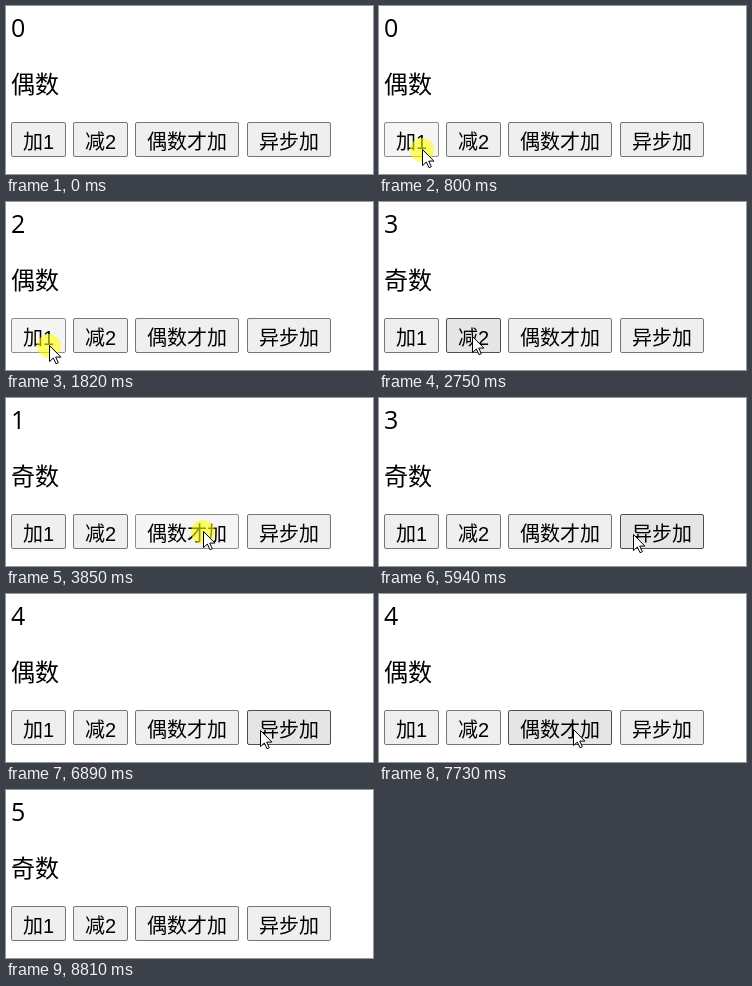
Recreate the animation shown at these times as an HTML page. Size 367 by 168 pixels, loop 9270 ms.

```html
<!DOCTYPE html>
<html lang="zh-CN">
<head>
<meta charset="utf-8">
<title>计数器</title>
<style>
  html, body { margin: 0; width: 100%; height: 100%; overflow: hidden; background: #fff; }
  svg { display: block; width: 367px; height: 168px; }
  text { font-weight: 350; }
  #parity { font-size: 24px; font-family: "Noto Sans CJK SC", "Noto Sans CJK", sans-serif; }
  #count { font-size: 25px; font-weight: 400; font-family: "Open Sans", "Noto Sans", sans-serif; }
  .btn text { font-size: 20px; font-family: "Liberation Sans", "Noto Sans CJK SC", "Noto Sans CJK", sans-serif; }
  .btn rect { fill: #efefef; stroke: #767676; }
  .btn.hover rect { fill: #e5e5e5; stroke: #4f4f4f; }
  .btn.active rect { fill: #f5f5f5; stroke: #8d8d8d; }
  #glow { fill: #ff0; opacity: .58; }
</style>
</head>
<body>
<svg viewBox="0 0 367 168">
  <text id="count" x="5" y="31"></text>
  <text id="parity" x="5" y="87"></text>
  <g id="buttons"></g>
  <g id="pointer">
    <circle id="glow" cy="1" r="12"/>
    <path d="M.5 .5V16.6L4.3 13 7 18.7 9.3 17.7 6.7 12.1H11.9Z" fill="#fff" stroke="#000"/>
  </g>
</svg>
<script>
const LOOP = 9270, ENTER = 130, LEAVE = 8810;
const TICK = 76, HOLD = 150, ASYNC_DELAY = 480;
const TOP = 116, HEIGHT = 35;

const plusOne = n => n + 1;
const minusTwo = n => n - 2;
const plusIfEven = n => n % 2 ? n : n + 1;

const inc = { label: "加1", rule: plusOne };
const dec = { label: "减2", rule: minusTwo };
const even = { label: "偶数才加", rule: plusIfEven };
const later = { label: "异步加", rule: plusOne, delay: ASYNC_DELAY };
const buttons = [inc, dec, even, later];

// The pointer's stops: arrival time, ticks spent travelling, clicks made there
const visits = [
  { on: inc, x: 43, y: 143, arrive: 738, ticks: 9, clicks: [800, 1190, 1820] },
  { on: dec, x: 93, y: 134, arrive: 2420, ticks: 7, clicks: [2760] },
  { on: even, x: 197, y: 133, arrive: 3150, ticks: 3, clicks: [3380, 3850] },
  { on: inc, x: 12, y: 139, arrive: 4390, ticks: 5, clicks: [4555] },
  { on: even, x: 168, y: 133, arrive: 5010, ticks: 3, clicks: [5240] },
  { on: later, x: 254, y: 136, arrive: 5940, ticks: 3, clicks: [6260] },
  { on: even, x: 194, y: 135, arrive: 7730, ticks: 4, clicks: [8080] },
  { x: 278, y: 163, arrive: 8725, ticks: 3, clicks: [] }
];

const presses = visits.flatMap(v => v.clicks);
const updates = visits
  .flatMap(({ on, clicks }) => clicks.map(at => ({ at: at + HOLD + (on.delay || 0), rule: on.rule })))
  .sort((a, b) => a.at - b.at);

const $ = id => document.getElementById(id);

function add(parent, tag, attrs, text = "") {
  const el = document.createElementNS("http://www.w3.org/2000/svg", tag);
  for (const key in attrs) el.setAttribute(key, attrs[key]);
  el.textContent = text;
  return parent.appendChild(el);
}

// Lay the buttons out in a row, each as wide as its label plus padding
let left = 5;
for (const b of buttons) {
  b.x = Math.floor(left);
  b.w = 24 + [...b.label].reduce((sum, ch) => sum + (ch < "a" ? 11 : 20), 0);
  b.el = add($("buttons"), "g", {});
  add(b.el, "rect", { x: b.x + .5, y: TOP + .5, width: b.w - 1, height: HEIGHT - 1, rx: 1.5 });
  add(b.el, "text", { x: b.x + 12, y: 143 }, b.label);
  left += b.w + 7.4;
}

function pointerAt(t) {
  let x = 298, y = 168;
  for (const v of visits) {
    const start = v.arrive - (v.ticks - 1) * TICK;
    if (t < start) break;
    const p = Math.min(1, (Math.floor((t - start) / TICK) + 1) / v.ticks);
    x += (v.x - x) * p;
    y += (v.y - y) * p;
  }
  return [Math.round(x), Math.round(y)];
}

function draw(t) {
  const [x, y] = pointerAt(t);
  const shown = t >= ENTER && t < LEAVE;
  const down = presses.some(at => t >= at && t < at + HOLD);
  const value = updates.reduce((n, u) => u.at <= t ? u.rule(n) : n, 0);

  $("count").textContent = value;
  $("parity").textContent = value % 2 ? "奇数" : "偶数";
  $("pointer").style.display = shown ? "" : "none";
  $("pointer").setAttribute("transform", `translate(${x} ${y})`);
  $("glow").style.display = down ? "" : "none";

  for (const b of buttons) {
    const over = shown && x >= b.x && x < b.x + b.w && y >= TOP && y < TOP + HEIGHT;
    b.el.setAttribute("class", "btn" + (over ? down ? " active" : " hover" : ""));
  }
}

const begin = performance.now();
function frame() {
  draw((performance.now() - begin) % LOOP);
  requestAnimationFrame(frame);
}
draw(0);
requestAnimationFrame(frame);
</script>
</body>
</html>
```
